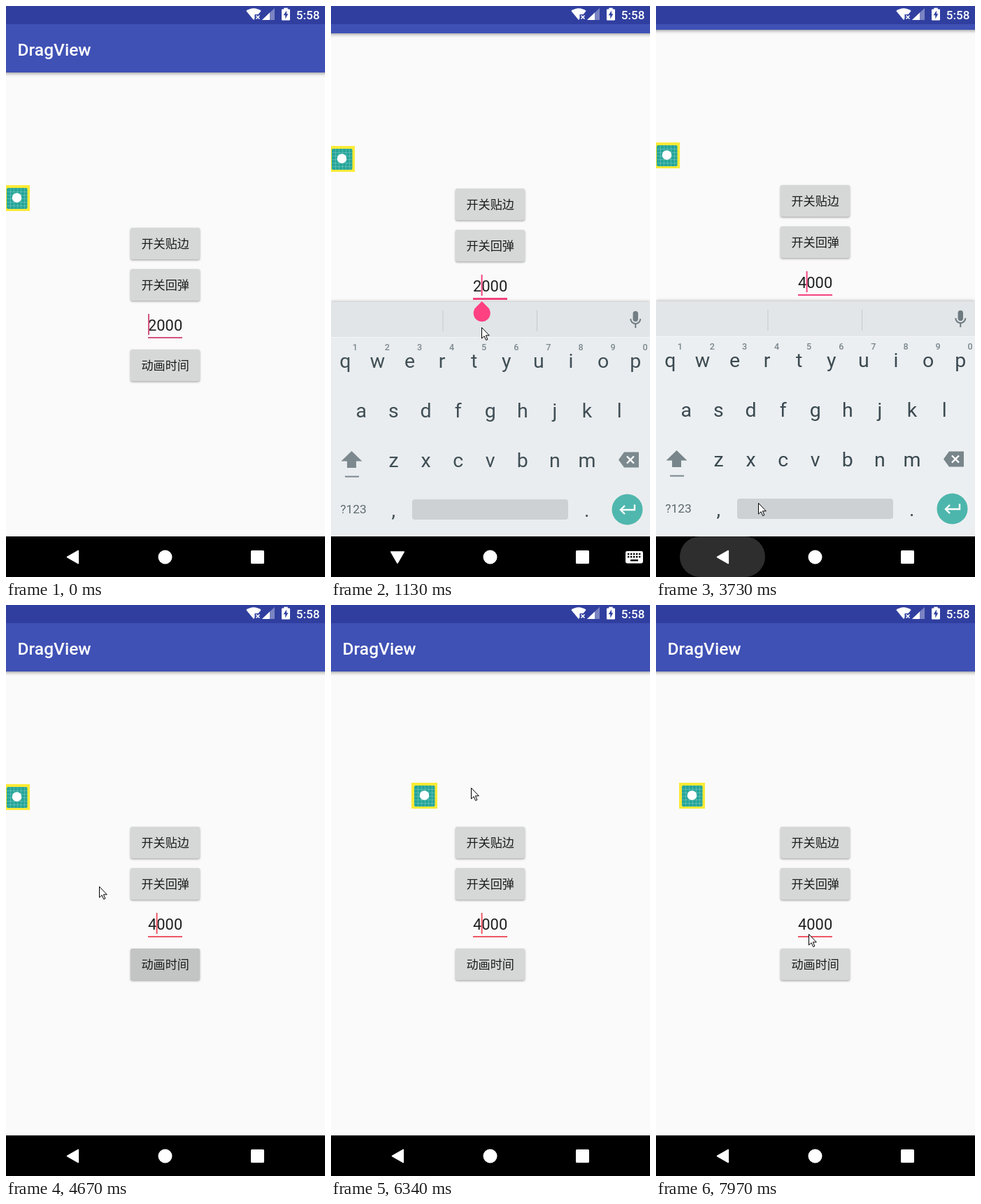
Recreate the animation shown at these times as an HTML page with a canvas. Size 456 px wide and 816 px high, loop 8000 ms.

```html
<!DOCTYPE html>
<html lang="zh">
<head>
<meta charset="utf-8">
<title>DragView</title>
<style>
html, body { margin: 0; width: 100%; height: 100%; overflow: hidden; background: #fafafa; }
canvas { display: block; }
</style>
</head>
<body>
<canvas id="stage" width="456" height="816"></canvas>
<script>
const c = document.getElementById('stage').getContext('2d');
const LOOP = 8000, PAN = 61, PITCH = 46.1;
const ROBOTO = 'Roboto, sans-serif';
const CJK = '"Noto Sans CJK SC", "Noto Sans CJK", sans-serif';

// easing
const clamp = x => Math.max(0, Math.min(1, x));
const span = (t, a, b) => clamp((t - a) / (b - a));
const smooth = x => x * x * (3 - 2 * x);
const out = (x, n = 2) => 1 - (1 - x) ** n;
const linear = x => x;

function bounce(x) {
  x *= 1.1226;
  const arc = (mid, base) => 8 * (x - mid) ** 2 + base;
  if (x < 0.3535) return arc(0, 0);
  if (x < 0.7408) return arc(0.54719, 0.7);
  if (x < 0.9644) return arc(0.8526, 0.9);
  return arc(1.0435, 0.95);
}

// pointer keys: time, x, y, easing towards this key
const pointerKeys = [
  [30, 380, 815], [570, 215, 459, smooth],
  [2730, 215, 459], [3270, 93, 785, smooth],
  [3635, 93, 785], [3725, 146, 710, linear],
  [3760, 146, 710], [4200, 232, 524, smooth],
  [4480, 232, 524], [4880, 20, 263, smooth],
  [5200, 20, 263], [5450, 200, 261, smooth],
  [6540, 200, 261], [6850, 212, 454, smooth], [7330, 215, 464, out],
  [7380, 215, 464], [7950, 218, 470, smooth]
];

function pointerAt(t) {
  const i = pointerKeys.findIndex(k => k[0] > t);
  if (i === 0) return pointerKeys[0].slice(1, 3);
  if (i < 0) return pointerKeys[pointerKeys.length - 1].slice(1, 3);
  const a = pointerKeys[i - 1], b = pointerKeys[i];
  const k = (b[3] || linear)(span(t, a[0], b[0]));
  return [a[1] + (b[1] - a[1]) * k, a[2] + (b[2] - a[2]) * k];
}

function iconAt(t, pointer) {
  if (t < 5200) return [-3, 256];
  const k = (pointer[0] - 20) / 180;
  if (t < 5592) return [-3 + 181 * k, 256 - 2 * k];
  return [178 * (1 - bounce((t - 5592) / 4000)), 254];
}

function caretOn(t) {
  const flips = [70, 570, 1420, 1880, 2800, 3270, 3780, 4290, 4800, 5300, 5800, 6300, 6800, 7300, 7800];
  return flips.filter(f => f <= t).length % 2 === 0;
}

// drawing helpers
function rect(x, y, w, h, color, r = 0) {
  c.fillStyle = color;
  c.beginPath();
  c.roundRect(x, y, w, h, r);
  c.fill();
}

function disc(x, y, r, color) {
  c.fillStyle = color;
  c.beginPath();
  c.arc(x, y, r, 0, Math.PI * 2);
  c.fill();
}

function trace(points, close) {
  c.beginPath();
  for (let i = 0; i < points.length; i += 2) c.lineTo(points[i], points[i + 1]);
  if (close) c.closePath();
}

function poly(points, color) {
  trace(points, true);
  c.fillStyle = color;
  c.fill();
}

function line(points, color, width) {
  trace(points);
  c.strokeStyle = color;
  c.lineWidth = width;
  c.stroke();
}

function text(s, x, y, size, color, { weight = 400, align = 'left', family = ROBOTO } = {}) {
  c.font = `${weight} ${size}px ${family}`;
  c.textAlign = align;
  c.fillStyle = color;
  c.fillText(s, x, y);
}

function withShadow(color, blur, dy, draw) {
  c.save();
  c.shadowColor = color;
  c.shadowBlur = blur;
  c.shadowOffsetY = dy;
  draw();
  c.restore();
}

// parts
function button(label, y, press = 0, fade = 0) {
  withShadow('rgba(0,0,0,.35)', 3, 1.3, () => rect(178, y, 99, 45, '#d6d7d7', 2.4));
  if (press > 0 && fade < 1) {
    c.save();
    c.beginPath();
    c.roundRect(178, y, 99, 45, 2.4);
    c.clip();
    disc(232, y + 30, 70 * press, `rgba(0,0,0,${0.09 * (1 - fade)})`);
    c.restore();
  }
  text(label, 227.7, y + 29, 17.1, '#1c1c1c', { align: 'center', family: CJK });
}

function field(t) {
  const value = t < 2160 ? '2000' : t < 2250 ? '000' : '4000';
  const left = value.length === 3 ? 209 : 203;
  const thick = t >= 720 && t < 2160 ? 3 : 2;
  const accent = t < 720 ? '#d4557f' : t < 4290 ? '#f4437f' : '#ef5866';
  text(value, 227.6, 464, 21.9, '#1f1f1f', { align: 'center' });
  rect(left, 473, 2 * (227.5 - left), thick, accent);
  if (caretOn(t)) {
    const x = t < 720 || value.length === 3 ? left : 214.6;
    rect(x, 440, 2, 30, accent);
  }
}

function handle(y) {
  c.save();
  c.translate(215.7, y);
  c.rotate(Math.PI / 4);
  rect(-12, -12, 24, 24, '#ff4081', [0, 12, 12, 12]);
  c.restore();
}

function icon([x, y]) {
  c.save();
  c.translate(Math.round(x), Math.round(y));
  rect(0, 0, 37, 37, '#fbea37');
  rect(4, 4, 29.5, 30, '#26a69a', 2);
  for (let i = 1; i < 6; i++) {
    const p = 4 + i * 5;
    rect(p, 4, 0.7, 30, 'rgba(255,255,255,.28)');
    rect(4, p, 29.5, 0.7, 'rgba(255,255,255,.28)');
  }
  disc(18.5, 18, 6.8, '#fff');
  c.restore();
}

function app(t, pan) {
  rect(0, 0, 456, 816, '#fafafa');
  c.save();
  c.translate(0, -pan);
  button('开关贴边', 317);
  button('开关回弹', 376);
  field(t);
  button('动画时间', 491, out(span(t, 4420, 4600)), span(t, 4680, 5080));
  withShadow('rgba(0,0,0,.4)', 5, 1.5, () => rect(-10, 20, 476, 75, '#3f51b5'));
  text('DragView', 16.6, 71, 24.5, '#fff', { weight: 500 });
  c.restore();
}

function statusBar() {
  rect(0, 0, 456, 26, '#303f9f');
  c.fillStyle = '#fff';
  c.beginPath();
  c.moveTo(354, 20);
  c.lineTo(343.3, 7);
  c.quadraticCurveTo(354, -0.5, 364.7, 7);
  c.closePath();
  c.fill();
  rect(355.5, 12, 10, 9, '#303f9f');
  line([357.5, 13.5, 362.5, 18.5], '#fff', 1.6);
  line([362.5, 13.5, 357.5, 18.5], '#fff', 1.6);
  poly([384, 3, 384, 20, 366, 20], '#7a84c2');
  poly([377, 9.6, 377, 20, 366, 20], '#fff');
  rect(394, 4.5, 12, 16, '#fff', 1.3);
  rect(397.3, 2.7, 5.4, 3, '#fff');
  poly([401, 6.5, 396.7, 13.3, 399.3, 13.3, 399.3, 18.5, 403.3, 11.3, 401, 11.3], '#303f9f');
  text('5:58', 414.7, 19, 17.1, '#fff', { weight: 500 });
}

function keyboard(alpha, dy) {
  if (alpha <= 0) return;
  const ink = '#3b4a51', soft = '#78868c', mid = { align: 'center' };
  c.save();
  c.beginPath();
  c.rect(0, 0, 456, 758);
  c.clip();
  c.globalAlpha = alpha;
  c.translate(0, dy);
  withShadow('rgba(0,0,0,.25)', 4, -1, () => rect(0, 422, 456, 336, '#eceff1'));
  rect(0, 422, 456, 50, '#e2e6e8');
  rect(0, 472, 456, 1, '#f4f6f7');
  rect(159.5, 434, 1, 30, '#c3c9cc');
  rect(294, 434, 1, 30, '#c3c9cc');

  rect(431.6, 435, 7.4, 15, '#6d7a80', 3.7);
  c.beginPath();
  c.arc(435.3, 446, 7, 0, Math.PI);
  c.strokeStyle = '#6d7a80';
  c.lineWidth = 2;
  c.stroke();
  rect(434.3, 453, 2, 6, '#6d7a80');

  // each row starts a half or whole key further in
  [['qwertyuiop', 0], ['asdfghjkl', 0.5], ['zxcvbnm', 1.5]].forEach(([row, indent], r) => {
    [...row].forEach((ch, i) => text(ch, 20.3 + (i + indent) * PITCH, 516 + r * 71, 28.5, ink, mid));
  });
  [...'1234567890'].forEach((ch, i) =>
    text(ch, 34.3 + i * PITCH, 491, 12.6, soft, { weight: 500, align: 'center' }));

  poly([29.5, 635, 44.5, 649.5, 36, 649.5, 36, 659, 23, 659, 23, 649.5, 14.5, 649.5], soft);
  rect(20, 670.5, 20, 2, soft);
  poly([411, 647.5, 419, 636.5, 440, 636.5, 440, 658.5, 419, 658.5], soft);
  line([423, 642.5, 433, 652.5], '#fff', 2.4);
  line([433, 642.5, 423, 652.5], '#fff', 2.4);

  text('?123', 32, 724, 17.4, '#5a686e', mid);
  text(',', 89.3, 729, 28.5, ink, mid);
  text('.', 365.8, 729, 28.5, ink, mid);
  rect(116, 704, 223, 29, '#cdd1d3', 4);
  disc(423.5, 718.5, 22, '#4db6ac');
  line([434, 711.5, 434, 719, 414, 719], '#fff', 2.4);
  line([420, 713, 414, 719, 420, 725], '#fff', 2.4);
  c.restore();
}

function navBar(t) {
  rect(0, 758, 456, 58, '#000');
  const grow = out(span(t, 3610, 3720)), fade = span(t, 3760, 4000);
  if (grow > 0 && fade < 1) {
    c.globalAlpha = 1 - fade;
    rect(95 - 61 * grow, 758, 122 * grow, 58, '#2e2e2e', 29);
    c.globalAlpha = 1;
  }
  const typing = t >= 840 && t < 3700;
  const back = typing ? [85.8, 780, 104.2, 780, 95, 796] : [87.5, 787.5, 103.3, 778.5, 103.3, 796.5];
  c.lineJoin = 'round';
  poly(back, '#fff');
  c.strokeStyle = '#fff';
  c.lineWidth = 1.6;
  c.stroke();
  c.lineJoin = 'miter';
  disc(227.5, 787.5, 10, '#fff');
  rect(350, 778, 19, 19, '#fff', 1.5);
  if (!typing) return;
  rect(421, 779, 25, 17.5, '#fff', 2.4);
  for (let i = 0; i < 10; i++) {
    rect(424 + (i % 5) * 4, 782 + Math.floor(i / 5) * 4, 2.4, 2.4, '#000');
  }
  rect(428, 791, 11, 2.4, '#000');
}

function pointer([x, y]) {
  c.save();
  c.translate(Math.round(x) + 0.5, Math.round(y) + 0.5);
  poly([0, 0, 0, 15.5, 3.6, 12.2, 6.2, 18, 8.4, 17, 5.9, 11.3, 10.8, 11.3], '#fff');
  c.strokeStyle = '#000';
  c.lineWidth = 1;
  c.stroke();
  c.restore();
}

function draw(t) {
  const open = span(t, 800, 1270), close = span(t, 3770, 4250);
  const pan = Math.round(PAN * (out(open) - out(close)));
  const rise = out(open, 3), sink = span(t, 3770, 3980);
  const at = pointerAt(t), pos = iconAt(t, at);
  app(t, pan);
  icon([pos[0], pos[1] - pan]);
  keyboard(rise * (1 - sink), Math.round(33 * (1 - rise + sink * sink)));
  if (t >= 720 && t < 2160) handle(495 - pan);
  statusBar();
  navBar(t);
  pointer(at);
}

const start = performance.now();
function tick() {
  draw((performance.now() - start) % LOOP);
  requestAnimationFrame(tick);
}
tick();
</script>
</body>
</html>
```
